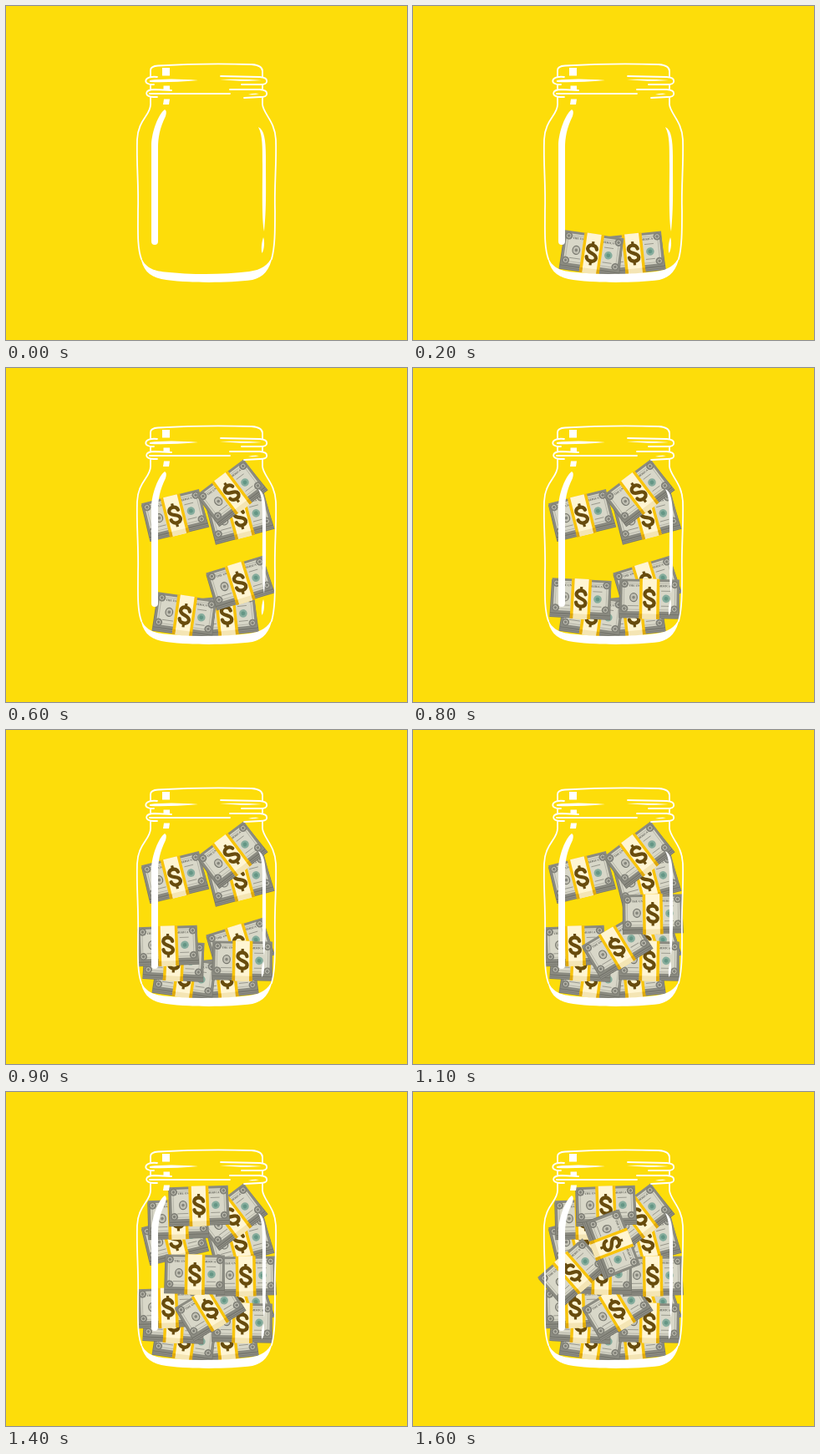
Write an HTML page that moves like this. It is 480 px wide and 400 px high and loops after 1.7 s.

```html
<!DOCTYPE html>
<html lang="en">
<head>
<meta charset="utf-8">
<title>Savings jar</title>
<style>
  html, body { margin: 0; width: 100%; height: 100%; overflow: hidden; background: #fddd0a; }
  svg { display: block; width: 480px; height: 400px; }
  text { font: bold 3.5px "Liberation Serif", serif; fill: #5c5c54; }
</style>
</head>
<body>
<svg viewBox="0 0 480 400">
  <defs>
    <g id="corner">
      <circle r="4.6" fill="#828279"/>
      <circle r="2.3" fill="none" stroke="#c9c8bb" stroke-width=".9"/>
    </g>
    <g id="bundle">
      <!-- stack of notes -->
      <path d="M-36-21H35L36.500 24H-36.500Z" fill="#76766d"/>
      <path d="M-36 20.500H36M-36 22.500H36" stroke="#a3a298" stroke-width=".7"/>
      <!-- top note -->
      <path d="M-35.500-23H35.500V18.500H-35.500Z" fill="#8b8b81"/>
      <path d="M-32.500-20H32.500V15.500H-32.500Z" fill="#d8d7c8"/>
      <path d="M-30.500-18H30.500V13.500H-30.500Z" fill="none" stroke="#aaa99d" stroke-width=".7"/>
      <use href="#corner" x="-30" y="-17"/><use href="#corner" x="30" y="-17"/>
      <use href="#corner" x="-30" y="12.500"/><use href="#corner" x="30" y="12.500"/>
      <text x="-25" y="-14">THE UN</text>
      <text x="25" y="-14" text-anchor="end">MERICA</text>
      <ellipse cx="-19" cy="-1" rx="4.300" ry="5" fill="#c2c1b4" stroke="#77776e" stroke-width="1.200"/>
      <circle cx="-19" cy="-1" r="1.800" fill="#85857c"/>
      <circle cx="20" cy="0" r="4.800" fill="#86ad9d"/>
      <circle cx="20" cy="0" r="2.400" fill="#649685"/>
      <path d="M-26 9H-13M14 9H25M14-9H25" stroke="#96958a" stroke-width=".9"/>
      <!-- paper band -->
      <path d="M-12-23.500H12V24.500H-12Z" fill="#f8c40c"/>
      <path d="M-8.500-23.500H8.500V24.500H-8.500Z" fill="#fff5d2"/>
      <path d="M-8.500 18.500H8.500V24.500H-8.500Z" fill="#f4e5b4"/>
      <path d="M-12 18.500H-8.500V24.500H-12ZM8.500 18.500H12V24.500H8.500Z" fill="#dfa90c"/>
      <g fill="none" stroke="#684c0d">
        <path d="M5.300-5C4.500-11-5.600-11-5.600-5C-5.600 1 5.700-.7 5.700 5.500C5.700 11.300-5 11-5.700 5" stroke-width="4.300" stroke-linecap="round"/>
        <path d="M0-14V-9M0 9.500V14.500" stroke-width="3.200"/>
      </g>
    </g>
  </defs>

  <rect width="480" height="400" fill="#fddd0a"/>
  <g id="pile"></g>

  <g fill="none" stroke="#fff" stroke-width="1.800" stroke-linecap="round" stroke-linejoin="round">
    <!-- rim and threads -->
    <path d="M173 85V77Q173 72 182 71.500C215 69.500 265 69 294 70Q307 71 307 78V85"/>
    <path d="M181 85C164 83 163 95 177 94M173 95V100M307 95V100"/>
    <path d="M257 84L304 85C315 86 315 94 304 94H282"/>
    <path d="M198 101L178 100C165 100 165 109 177 109H181M172 105H268"/>
    <path d="M268 100L304 100C315 101 315 109 304 109L285 110"/>
    <!-- sides -->
    <path d="M173 110V118C173 131 158 136 157 160C156 190 159 215 158 245C158 270 157 289 162 303"/>
    <path d="M307 110V118C308 129 322 138 323 160C324 190 321 215 322 245C322 270 322 288 318 303"/>
  </g>
  <g fill="#fff">
    <path d="M172 89Q195 86 230 89Q195 92 172 91ZM256 88Q285 87 306 89Q285 91 256 88ZM290 106Q297 104 303 105Q297 107 290 106Z"/>
    <path d="M187 74H196V83.500H187ZM188.500 95.500H196V100H188.500ZM189 111.500H196L195 118H188Z"/>
    <path d="M190 124Q193 125 191 132C184 146 182 158 182 170V282Q182 286 178 286Q174 286 174 282V165C175 150 182 130 190 124Z"/>
    <path d="M302 145C309 148 311 160 311 180C311 220 312 240 309 270C306 255 307 220 307 190C307 165 307 155 302 145Z"/>
    <path d="M308 277C310 282 309 292 306.500 296C305 292 306 283 308 277Z"/>
    <path d="M161 299C166 314 177 317 190 318.500C222 322 260 322 291 318C305 316 314 311 319 299C316 316 308 325 295 328C264 332 214 332 186 327C171 324 163 315 161 299Z"/>
  </g>
</svg>
<script>
  const STEP = 100, LOOP = 1700;

  // x, y, angle of each bundle, in order of arrival
  const places = [
    [264, 296, -6], [214, 296, 8], [280, 257, -17], [280, 179, -15],
    [202, 176, -14], [270, 149, -37], [201, 276, 3], [283, 276, 1],
    [194, 258, -2], [244, 260, -31], [287, 220, -1], [226, 218, 1],
    [206, 152, -2], [231, 136, -2], [191, 216, -41], [238, 182, 69]
  ];

  const pile = document.getElementById("pile");
  const bundles = places.map(([x, y, angle]) => {
    const use = document.createElementNS("http://www.w3.org/2000/svg", "use");
    use.setAttribute("href", "#bundle");
    use.setAttribute("transform", `translate(${x} ${y}) rotate(${angle})`);
    return pile.appendChild(use);
  });

  const start = performance.now();

  function draw() {
    const count = Math.floor((performance.now() - start) % LOOP / STEP);
    bundles.forEach((bundle, i) => bundle.style.display = i < count ? "" : "none");
    requestAnimationFrame(draw);
  }
  draw();
</script>
</body>
</html>
```
